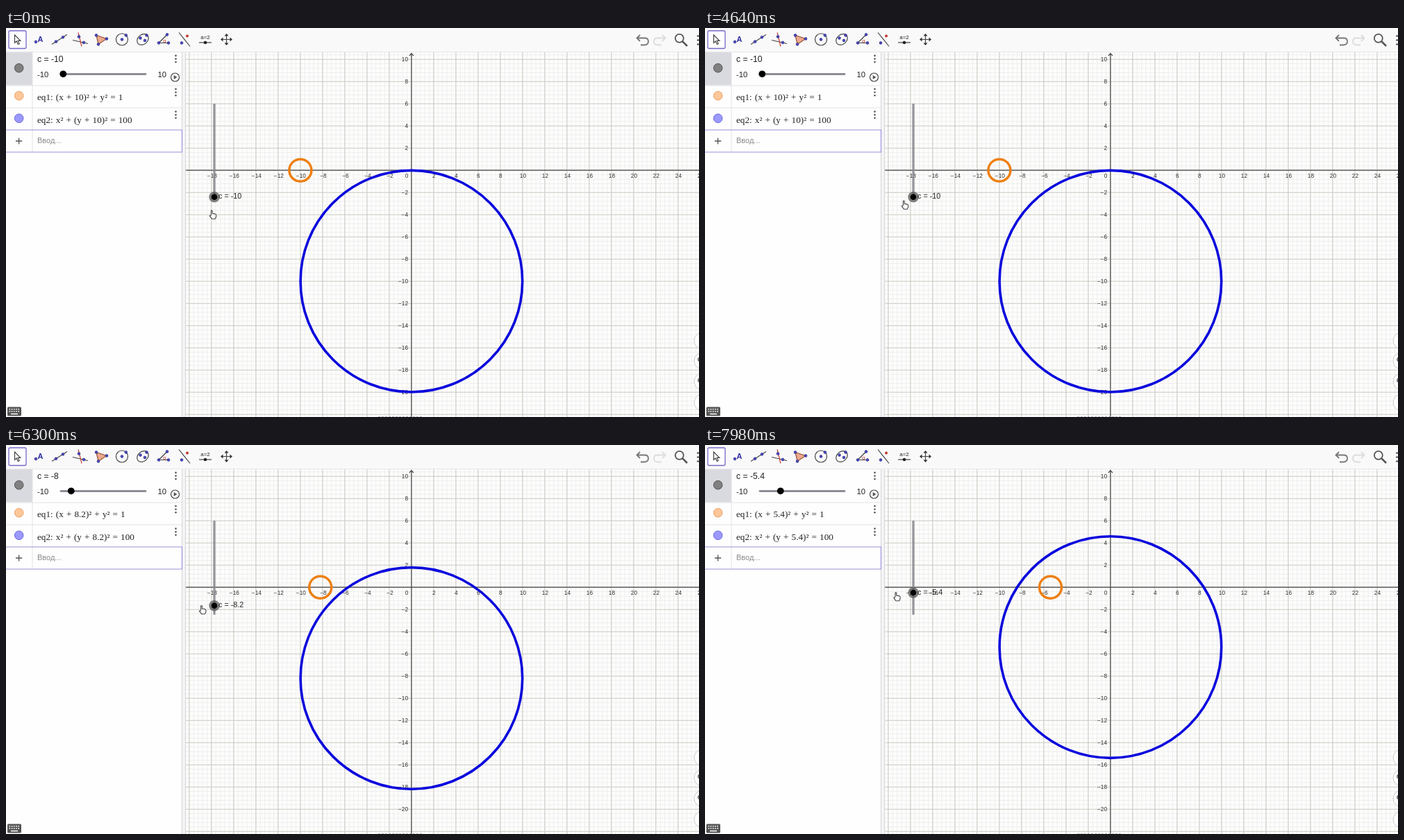
Animation of 998x561 px, one loop 8000 ms. Source, as an HTML page:

```html
<!DOCTYPE html>
<html lang="ru">
<head>
<meta charset="utf-8">
<title>Circles with a slider</title>
<style>
  html, body { margin: 0; width: 100%; height: 100%; overflow: hidden; background: #fdfdfd; }
  svg { display: block; width: 100%; height: 100%; }
  text { font-family: "Liberation Sans", Arial, sans-serif; fill: #222; white-space: pre; }
  .axis { font-size: 8.3px; fill: #333; }
  .math { font-family: "Liberation Serif", serif; font-size: 13.2px; word-spacing: .8px; }
  .line { fill: none; stroke: #444; stroke-width: 1.2; }
  .dot { fill: #4a48c8; stroke: #22226a; stroke-width: .6; }
  .red { fill: #c0392b; }
</style>
</head>
<body>
<svg viewBox="0 0 998 561">
  <defs>
    <clipPath id="plot"><path d="M259 35H998V561H259Z"/></clipPath>
    <g id="more" fill="#555">
      <circle cy="-4.6" r="1.3"/><circle r="1.3"/><circle cy="4.6" r="1.3"/>
    </g>
    <circle id="pt" class="dot" r="1.9"/>
  </defs>

  <g id="graph" clip-path="url(#plot)">
    <path d="M259 35H998V561H259Z" fill="#fdfdfc"/>
    <path id="minor" fill="none" stroke="#eeeeef"/>
    <path id="major" fill="none" stroke="#cdcdc5" stroke-width="1.1"/>
    <path class="line" d="M259 205.2H998M583.9 561V37M580.8 40.2L583.9 36.6L587 40.2"/>
    <g id="labels"></g>
    <path d="M536 560.6H600" stroke="#999" stroke-width=".8" stroke-dasharray="3 2"/>
    <circle id="small" cy="205.2" r="16" fill="none" stroke="#ee7f11" stroke-width="3.5"/>
    <circle id="large" cx="583.9" r="159.8" fill="none" stroke="#0a06dc" stroke-width="3.6"/>
    <path d="M300 110.3V243.5" stroke="#8b8790" stroke-opacity=".9" stroke-width="3.2" stroke-linecap="round"/>
    <g id="knob">
      <circle r="7.7" fill="#555" fill-opacity=".75"/>
      <circle r="4.3" fill="#000"/>
      <text id="knobText" x="6" y="2.6" font-size="10.8"></text>
    </g>
    <g id="zoomButtons" fill="#fff" stroke="#c9c9cc"></g>
    <path d="M998 475.5Q995.5 478 998 480.500M998 505.5Q995.5 508 998 510.500" class="line"/>
  </g>

  <g id="panel">
    <path d="M0 35H254V561H0Z" fill="#fefefe"/>
    <path d="M254 35H259V561H254Z" fill="#f4f4f5"/>
    <path d="M253.500 35V561M258.600 35V561" stroke="#d6d6da"/>
    <path d="M0 35H38V82.500H0Z" fill="#d9d9e0"/>
    <path d="M38 35V179M0 83H253M0 115H253" fill="none" stroke="#e2e2e5"/>
    <path d="M0 147H253.500V179H0" fill="none" stroke="#9a92dc" stroke-width="1.2"/>
    <circle cx="18.700" cy="57.700" r="6.300" fill="#808080" stroke="#555"/>
    <circle cx="18.700" cy="97.700" r="6.300" fill="#ffc799" stroke="#e6a066"/>
    <circle cx="18.700" cy="130.200" r="6.300" fill="#9b99ff" stroke="#6c69dd"/>
    <path d="M14 163H23.200M18.600 158.400V167.600" stroke="#555" stroke-width="1.3"/>
    <use href="#more" x="244.500" y="44.500"/>
    <use href="#more" x="244.500" y="92.700"/>
    <use href="#more" x="244.500" y="125.200"/>
    <text id="value" x="45" y="48.500" font-size="12.200"></text>
    <text x="45" y="70.600" font-size="11.300">-10</text>
    <text x="218.500" y="70.600" font-size="11.300">10</text>
    <path d="M79 66.500H201" stroke="#8f8c96" stroke-width="2.800" stroke-linecap="round"/>
    <circle id="thumb" cy="66.300" r="4.900" fill="#000"/>
    <circle cx="243.500" cy="71" r="6" class="line"/>
    <path d="M241.700 68L246.500 71L241.700 74Z" fill="#555"/>
    <text id="eq1" class="math" x="45" y="104"></text>
    <text id="eq2" class="math" x="45" y="136.500"></text>
    <text x="45" y="166" font-size="11" style="fill:#8a8a8a">Ввод...</text>
    <rect x="2" y="546.500" width="20" height="13" rx="1.500" fill="#555"/>
    <path d="M4.500 549.800H20M4.500 553H20" stroke="#fff" stroke-width="1.600" stroke-dasharray="1.700 1.500"/>
    <path d="M7 556.600H17" stroke="#fff" stroke-width="1.500"/>
  </g>

  <g id="toolbar">
    <path d="M0 0H998V34.500H0Z" fill="#f9f9fa"/>
    <path d="M0 34.700H998" stroke="#e6e6e9"/>
    <rect x="4" y="4" width="25" height="25.500" rx="2" fill="#fff" stroke="#7468c8" stroke-width="1.300"/>
    <g transform="translate(16.500 16.500)">
      <path class="line" d="M-4 -6.500V5L-1.300 2.600L.8 7L2.700 6.100L.7 1.900H4.300Z"/>
    </g>
    <g transform="translate(47 16.500)">
      <use href="#pt" x="-4" y="3.500"/>
      <text x="-1.500" y="3.500" font-size="11" font-weight="bold" style="fill:#2d2ca0">A</text>
    </g>
    <g transform="translate(77 16.500)">
      <path class="line" d="M-11 7L11 -7"/>
      <use href="#pt" x="-5" y="3.200"/><use href="#pt" x="5" y="-3.200"/>
    </g>
    <g transform="translate(107 16.500)">
      <path class="line" d="M-11 1L11 6"/><path class="line" d="M-3 -10L2 10" style="stroke:#c0392b"/>
      <use href="#pt" x="-2" y="-4"/><use href="#pt" x="5" y="4.500"/>
    </g>
    <g transform="translate(137 16.500)">
      <path class="line" d="M-7 -6L8 -1L-4 7Z" style="fill:#eba98e;stroke:#96523a"/>
      <use href="#pt" x="-7" y="-6"/><use href="#pt" x="8" y="-1"/><use href="#pt" x="-4" y="7"/>
    </g>
    <g transform="translate(167 16.500)">
      <circle class="line" r="8.500"/><use href="#pt"/><use href="#pt" x="5.800" y="-6"/>
    </g>
    <g transform="translate(197 16.500)">
      <ellipse class="line" rx="9" ry="7" transform="rotate(-40)"/>
      <use href="#pt" x="-3.500" y="-2"/><use href="#pt" x="3" y="1.500"/><use href="#pt" x="5.500" y="-6"/>
    </g>
    <g transform="translate(227 16.500)">
      <path class="line" d="M5 -7L-7 5H8"/>
      <text x="-1" y="4" font-size="8" style="fill:#c0392b">α</text>
      <use href="#pt" x="5" y="-7"/><use href="#pt" x="-7" y="5"/><use href="#pt" x="7" y="5"/>
    </g>
    <g transform="translate(257 16.500)">
      <path class="line" d="M-8 -10L8 10"/>
      <circle class="red" cx="4" cy="-5" r="2"/><use href="#pt" x="-4" y="5"/>
    </g>
    <g transform="translate(287 16.500)">
      <text y="-1" font-size="8" text-anchor="middle">a=2</text>
      <path class="line" d="M-9 4.500H9"/><circle cy="4.500" r="2.300" fill="#222"/>
    </g>
    <g transform="translate(317.500 16.500)">
      <path class="line" d="M-7 0H7M0 -7V7"/>
      <path d="M0 -8.500L3 -5H-3ZM0 8.500L3 5H-3ZM-8.500 0L-5 -3V3ZM8.500 0L5 -3V3Z" fill="#333"/>
    </g>
    <g fill="none" stroke="#777" stroke-width="1.800">
      <path id="undo" d="M913 10L908.500 14.500L913 19M909 14.500H920Q925 14.500 925 19.300Q925 24.500 919 24.500H914"/>
      <path stroke="#dcdcdf" d="M945 10L949.500 14.500L945 19M949 14.500H938Q933 14.500 933 19.300Q933 24.500 939 24.500H944"/>
      <circle cx="969.800" cy="14.800" r="6" stroke="#555"/>
      <path d="M974.300 19.300L981 26" stroke="#555" stroke-width="2.600"/>
      <path d="M995 11.500H998M995 17.500H998M995 23.500H998" stroke="#555"/>
    </g>
  </g>

  <path id="hand" d="M-2.600 1V-5.200Q-1.700 -6.900 -.8 -5.200V-1.400Q4.600 -1.400 4.600 1V3.200Q4.200 5 3.200 6.200H-1.600L-4.600 2.200Q-4.700 .6 -2.600 1.800"
        fill="#fff" stroke="#444" stroke-width="1.100" stroke-linejoin="round"/>
</svg>
<script>
const LOOP = 8000, X0 = 583.9, Y0 = 205.2, UNIT = 16;
const el = id => document.getElementById(id);
const place = (node, x, y) => node.setAttribute("transform", `translate(${x} ${y})`);

// Vertical and horizontal lines at multiples of a step around the origin.
function gridPath(step) {
  let d = "";
  for (let x = X0 - Math.floor((X0 - 259) / step) * step; x < 998; x += step) d += `M${x.toFixed(1)} 35V561`;
  for (let y = Y0 - Math.floor((Y0 - 35) / step) * step; y < 561; y += step) d += `M259 ${y.toFixed(1)}H998`;
  return d;
}

function axisLabel(value, x, y, anchor) {
  const text = String(value).replace("-", "−");
  return `<text class="axis" x="${x}" y="${y}" text-anchor="${anchor}">${text}</text>`;
}

function buildGraph() {
  el("minor").setAttribute("d", gridPath(UNIT * .4));
  el("major").setAttribute("d", gridPath(UNIT * 2));
  let labels = axisLabel(0, 577, 215.7, "middle");
  for (let v = -18; v <= 26; v += 2) {
    if (v) labels += axisLabel(v, X0 + v * UNIT + (v < 0 ? 1 : .5), 215.7, "middle");
  }
  for (let v = -20; v <= 10; v += 2) {
    if (v) labels += axisLabel(v, 579, Y0 - v * UNIT + 3, "end");
  }
  el("labels").innerHTML = labels;
  el("zoomButtons").innerHTML = [451, 480, 510, 540]
    .map(y => `<circle cx="1003" cy="${y}" r="12"/>`).join("");
}

// Linear interpolation over rows of [time, value, ...].
function along(keys, t, column = 1) {
  if (t <= keys[0][0]) return keys[0][column];
  const i = keys.findIndex(key => key[0] > t);
  if (i < 0) return keys[keys.length - 1][column];
  const a = keys[i - 1], b = keys[i];
  return a[column] + (b[column] - a[column]) * (t - a[0]) / (b[0] - a[0]);
}

const sliderSteps = [[5080, 0], [5820, 7], [6760, 13], [7425, 19], [7900, 23], [8019, 24]];
const handPath = [
  [3400, 298, 269], [4080, 295, 265], [4640, 288, 255], [4920, 287, 250],
  [5860, 285, 242], [6840, 281, 232], [7440, 279, 223], [7980, 276.5, 218.5]
];

const sliderAt = t => Math.round(-100 + 2 * Math.floor(along(sliderSteps, t) + 1e-6)) / 10;

function draw(t) {
  // The panel reacts first, then the drawing, then the equations.
  const panelC = sliderAt(t), c = sliderAt(t - 30), eqC = -sliderAt(t - 60);
  el("value").textContent = `c = ${panelC}`;
  el("thumb").setAttribute("cx", 82.3 + (panelC + 10) * 5.75);
  el("knobText").textContent = `c = ${c}`;
  place(el("knob"), 300, 243.8 - (c + 10) * 6.7);
  el("small").setAttribute("cx", X0 + c * UNIT);
  el("large").setAttribute("cy", Y0 - c * UNIT);
  el("eq1").textContent = `eq1: (x + ${eqC})² + y² = 1`;
  el("eq2").textContent = `eq2: x² + (y + ${eqC})² = 100`;
  place(el("hand"), along(handPath, t, 1), along(handPath, t, 2));
}

buildGraph();
const start = performance.now();
function tick() {
  draw((performance.now() - start) % LOOP);
  requestAnimationFrame(tick);
}
tick();
</script>
</body>
</html>
```
